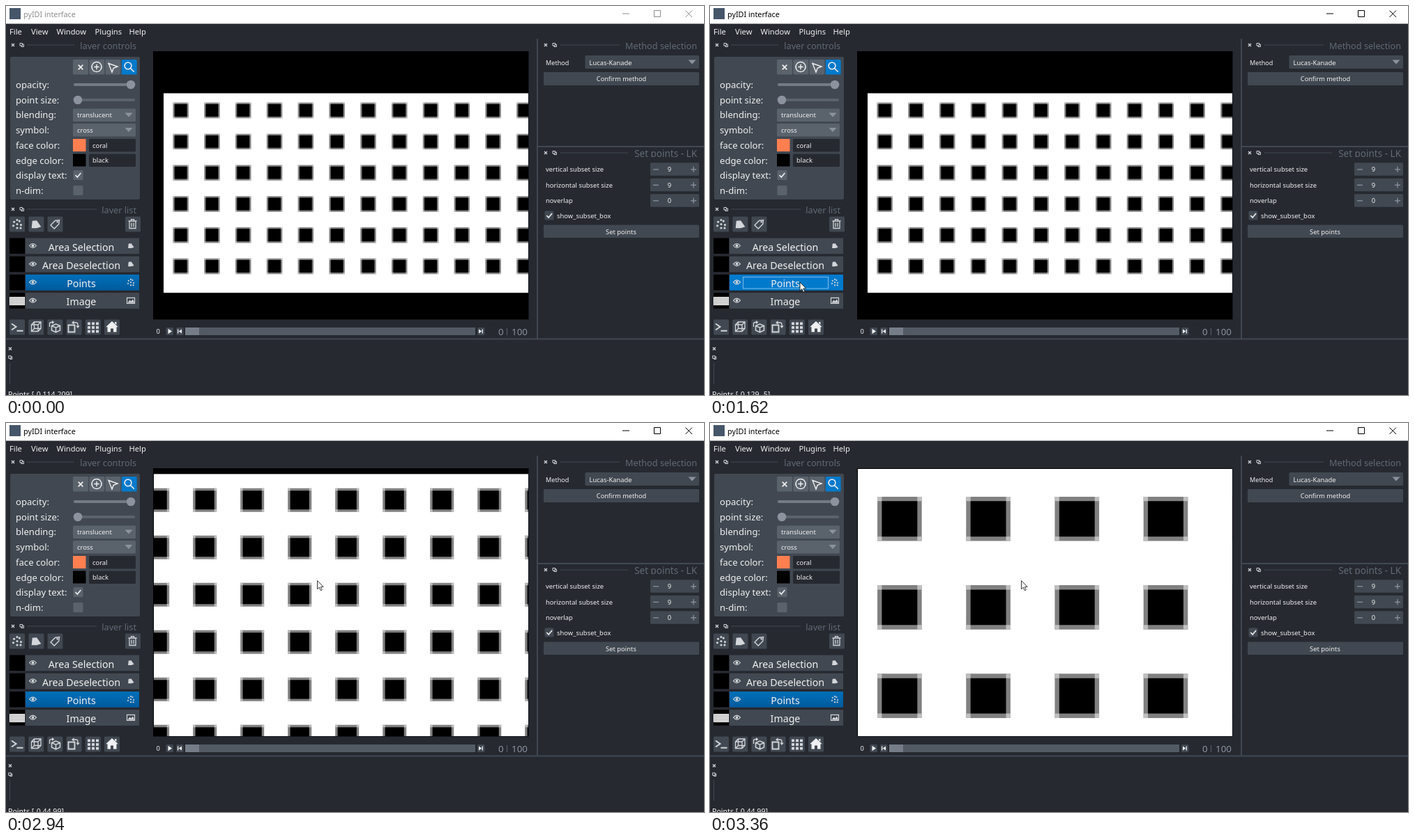
Animation, 1001 px wide and 559 px high, one loop 3.46 s. Source, as an HTML page:

```html
<!DOCTYPE html>
<html lang="en">
<head>
<meta charset="utf-8">
<title>pyIDI interface</title>
<style>
  html, body { margin: 0; width: 100%; height: 100%; overflow: hidden; background: #262930; }
  svg { display: block; position: absolute; left: 0; top: 0; }
  text { font-family: "Noto Sans", "Open Sans", sans-serif; white-space: pre; }
</style>
</head>
<body>
<svg id="stage" width="1001" height="559" viewBox="0 0 1001 559"></svg>
<script>
const BG = '#262930', PANEL = '#414851', PRIMARY = '#5a626c', LIGHT = '#8b939e',
      TEXT = '#f0f1f2', ICON = '#d3d6da', BLUE = '#007acc';

const rect = (x, y, w, h, fill, extra = '') =>
  `<rect x="${x}" y="${y}" width="${w}" height="${h}" fill="${fill}" ${extra}/>`;
const text = (x, y, str, size, fill = TEXT, anchor = 'start', extra = '') =>
  `<text x="${x}" y="${y}" font-size="${size}" fill="${fill}" text-anchor="${anchor}" ${extra}>${str}</text>`;
const line = (d, color = ICON, w = 1.4, extra = '') =>
  `<path d="${d}" fill="none" stroke="${color}" stroke-width="${w}" ${extra}/>`;
const shape = (d, fill = ICON) => `<path d="${d}" fill="${fill}"/>`;
const dot = (x, y, r, fill = ICON) => `<circle cx="${x}" cy="${y}" r="${r}" fill="${fill}"/>`;
const at = (x, y, body) => `<g transform="translate(${x} ${y})">${body}</g>`;
const cross = (x, y, r, color = ICON, w = 1.3) =>
  line(`M${x - r} ${y - r}l${2 * r} ${2 * r}m0 ${-2 * r}l${-2 * r} ${2 * r}`, color, w);
const box = (x, y, w, h, fill = PANEL) => rect(x, y, w, h, fill, 'rx="1.5"');
const check = (x, y) => line(`M${x + 3} ${y + 7}l2.8 3l5 -6`, TEXT, 1.6);
const arrow = (x, y) => shape(`M${x - 5.5} ${y - 3}h11l-5.5 6z`, LIGHT);

// Dock header: close and float marks, rule and a title whose descenders are cut off
const dockMarks = (x, y) => cross(x, y, 2) +
  line(`M${x + 10} ${y - 2.5}h3.5v3.5h-3.5zm2 3.5v1.5h3.5v-3.5h-2`, ICON, 1);
const dock = (x, y, x1, x2, right, title, size) => dockMarks(x, y) +
  line(`M${x1} ${y}H${x2}`, PANEL, 1) +
  text(right, y + 5.5, title, size, '#626a75', 'end') + rect(x2, y + 6.3, right - x2 + 3, 5, BG);

function titleBar() {
  return rect(0, 0, 1001, 25.5, '#fff') + rect(5, 3, 16, 16, '#46566a') +
    `<g id="caption">${text(25, 15.5, 'pyIDI interface', 10.8, 'currentColor')}` +
    line('M884 11H894M929.5 6.5h9v9h-9zM974.5 6.5l9.5 9.5m0 -9.5l-9.5 9.5', 'currentColor', 1) + '</g>' +
    [['File', 5], ['View', 36], ['Window', 72.5], ['Plugins', 127.5], ['Help', 176.5]]
      .map(([s, x]) => text(x, 41, s, 11.2)).join('');
}

function layerControls() {
  const labels = ['opacity:', 'point size:', 'blending:', 'symbol:', 'face color:',
                  'edge color:', 'display text:', 'n-dim:'];
  let s = dock(10, 56, 30, 98, 187, 'layer controls', 12.7) + rect(6, 73, 186, 205, PANEL, 'rx="2"');
  [96, 119.3, 142.5, 165.7].forEach((x, i) => s += box(x, 77, 22, 21.5, i === 3 ? BLUE : PRIMARY));
  s += cross(107, 88, 3.3, TEXT, 1.7) +
    line('M130 80.5a7 7 0 1 0 .01 0M130 83.7v7.6M126.2 87.5h7.6', TEXT, 1.4) +
    line('M147 82.5l13 4.5l-5.8 2.4l-2.2 5.6z', TEXT, 1.4) +
    line('M175 81a4.9 4.9 0 1 0 .01 0M178.5 89.5l5.3 5.3', TEXT, 1.6);
  labels.forEach((l, i) => s += text(14, 118 + i * 21.7, l, 13.1));
  [[113, 179], [135, 103]].forEach(([y, x]) =>
    s += rect(97, y - 2, 88, 4, PRIMARY, 'rx="2"') + dot(x, y, 6.3, LIGHT));
  s += rect(97, 111, 76, 4, '#737b86', 'rx="2"');
  [['translucent', 147.5], ['cross', 169]].forEach(([l, y]) =>
    s += box(96, y, 90, 18.5, PRIMARY) + text(102, y + 12.7, l, 9.4) + arrow(176, y + 9));
  [['coral', 191, '#ff7f50'], ['black', 212.5, '#000']].forEach(([l, y, c]) =>
    s += rect(96, y, 18.5, 18, c) + box(119, y, 67, 18.5, BG) + text(124, y + 12.6, l, 9.4));
  return s + box(96.5, 236, 14, 14, PRIMARY) + check(96.5, 236) + box(96.5, 258, 14, 14, PRIMARY);
}

const ICONS = {
  points: k => [[0, 0], [-4, -3], [3, -4], [5, 1], [-5, 2], [0, 5], [0, -5.5], [4.5, 5]]
    .map(([x, y]) => dot(x * k, y * k, 1.4 * k)).join(''),
  shapes: k => shape(`M${-5 * k} ${-5 * k}L${k} ${-5.5 * k}L${7 * k} ${3 * k}L${k} ${5 * k}L${-6 * k} ${5 * k}z`),
  image: () => line('M-5.5 -4h11v8h-11z', ICON, 1.2) + shape('M-4.5 3l3 -4l2 2l2.5 -3l2 5z'),
  eye: () => line('M-5 0Q0 -6 5 0Q0 6 -5 0z', ICON, 1.1) + dot(0, 0, 1.9)
};

function layerList() {
  let s = dock(10, 292, 30, 130, 187, 'layer list', 12.7);
  [5, 32.5, 59.5, 171].forEach(x => s += box(x, 302.5, 22, 22));
  s += at(16, 313.5, ICONS.points(1.1)) + at(43, 314, ICONS.shapes(1.05)) +
    line('M64 315l6.5 -6.5l6 -1l-.8 6l-6.5 6.5z') + dot(73.7, 310.3, 1.2) +
    line('M175.5 309h12M179.5 308.5v-1.8h4v1.8M177 309.5v10h9v-10M180 311.5v6M183 311.5v6', ICON, 1.3);
  [['Area Selection', 'shapes'], ['Area Deselection', 'shapes'], ['Points', 'points'], ['Image', 'image']]
    .forEach(([name, icon], i) => {
      const y = 333.5 + i * 26.2;
      s += rect(5, y, 22, 22.5, '#000') +
        rect(28, y, 163, 22.8, i === 2 ? 'url(#row)' : PANEL, i === 2 ? 'id="points"' : '') +
        text(108, y + 18, name, 14.2, TEXT, 'middle') +
        at(38.5, y + 11, ICONS.eye()) + at(179, y + 11.3, ICONS[icon](icon === 'points' ? .8 : .65));
    });
  s += rect(47.5, 389.5, 122, 16.5, 'none', 'id="focus" stroke="#7fbbe8" stroke-width="1"');
  s += rect(5, 418, 22, 12, '#fff');
  for (let i = 0; i < 60; i++) s += rect(6 + i % 10 * 2.1, 419 + Math.floor(i / 10) * 1.8, .9, .9, '#222');
  return s;
}

function viewerButtons() {
  let s = '';
  for (let i = 0; i < 6; i++) s += box(5 + i * 27.2, 450.5, 22, 22);
  s += line('M8 456.5l6.5 4.5l-6.5 4.5M15.5 466.8h9', ICON, 2) +
    line('M36.5 458l4 -4h9.5v9.5l-4 4h-9.5zM36.5 458h9.5v9.5M46 458l4 -4M40.5 454v9.5h9.5M40.5 463.5l-4 4', ICON, 1.3) +
    line('M65.5 459.5l6 -2.5l6 2.5v6.5l-6 3l-6 -3zM65.5 459.5l6 2.7l6 -2.7M71.5 462.2v6.8', ICON, 1.5) +
    line('M62.5 461v-4.5q0 -2 3 -2h1', ICON, 1.3) + shape('M66 452l3.5 2.5l-3.5 2.5z') +
    line('M89.5 458.5h9v10h-9z', ICON, 1.9) + line('M96.5 455h4q2.5 0 2.5 3v2', ICON, 1.3) +
    shape('M97.5 452.3v5.4l-3.5 -2.7zM100.3 459.5h5.4l-2.7 3.5z');
  for (let i = 0; i < 9; i++) s += rect(117 + i % 3 * 6, 454.5 + Math.floor(i / 3) * 5.6, 4, 3.8, ICON);
  return s + shape('M152 453l8.8 8.3h-2.3v7.2h-4.5v-5h-4v5h-4.5v-7.2h-2.3zM156 454h2.4v4l-2.4 -2z', '#eef0f1');
}

function dims() {
  let s = text(215.5, 471.3, '0', 9.4) + rect(257, 462, 416, 11, '#525a64') + rect(257, 462, 20, 11, '#757d88');
  [229.5, 244, 676].forEach(x => s += box(x, 462, 10.5, 11));
  return s + shape('M232.5 463.7l5.5 3.8l-5.5 3.8z', TEXT) +
    shape('M246 464.5h1.3v6h-1.3zM252 464.5v6l-4.3 -3z', TEXT) +
    shape('M678 464.5l4.3 3l-4.3 3zM682.7 464.5h1.3v6h-1.3z', TEXT) +
    text(706, 472.6, '0', 13.4, LIGHT) + line('M718.5 463v10', PRIMARY, 1) + text(725, 473, '100', 13.4, LIGHT);
}

function rightPanel() {
  let s = line('M762 47V478', PANEL, 2) + line('M762 202H1001M0 478.5H1001', PANEL, 2) +
    dock(774, 56, 795, 880, 991, 'Method selection', 12.7) +
    text(774, 84.5, 'Method', 9.1) + box(830.5, 71, 163.5, 19) + text(836.5, 84.5, 'Lucas-Kanade', 9.4) + arrow(984, 80.5) +
    box(771, 95, 223, 19) + text(882.5, 108.3, 'Confirm method', 9.2, TEXT, 'middle') +
    dock(774, 211, 795, 892, 991, 'Set points - LK', 13.5);
  [['vertical subset size', 9], ['horizontal subset size', 9], ['noverlap', 0]].forEach(([l, v], i) => {
    const y = 234.8 + i * 22.5;
    s += text(774, y + 3.6, l, 9.45) + box(924, y - 9.5, 70, 18.5) + text(951.5, y + 3.6, v, 9.4, TEXT, 'middle') +
      line(`M928 ${y}h8M982 ${y}h8M986 ${y - 4}v8`, LIGHT, 1.3);
  });
  return s + box(772.5, 294.5, 13, 13) + check(772.3, 294) + text(790, 305, 'show_subset_box', 9.45) +
    box(771, 314.5, 223, 18.5) + text(882, 327.5, 'Set points', 9.4, TEXT, 'middle');
}

// Test image in its own pixels: 10 px squares every 20 px with a grey one-pixel edge
function viewer() {
  let edge = '', corner = '', core = '';
  for (let c = 0; c < 14; c++) for (let r = 0; r < 6; r++) {
    const x = 6 + c * 20, y = 6 + r * 20;
    edge += `M${x} ${y}h10v10h-10z`;
    core += `M${x + 1} ${y + 1}h8v8h-8z`;
    for (const dx of [0, 9]) for (const dy of [0, 9]) corner += `M${x + dx} ${y + dy}h1v1h-1z`;
  }
  return rect(211, 65, 538.5, 385.5, '#000') +
    `<g clip-path="url(#view)"><g id="image">${rect(0, 0, 300, 128, '#fff')}` +
    shape(edge, '#808080') + shape(corner, '#bfbfbf') + shape(core, '#000') + '</g></g>';
}

const stage = document.getElementById('stage');
stage.innerHTML = `<defs>
  <linearGradient id="row" x2="0" y2="1"><stop stop-color="#0070ba"/><stop offset="1" stop-color="#005a9c"/></linearGradient>
  <clipPath id="view"><rect x="212" y="66" width="537" height="384"/></clipPath></defs>` +
  rect(0, 0, 1001, 559, BG) + titleBar() + layerControls() + layerList() + viewerButtons() +
  viewer() + dims() + rightPanel() +
  cross(6, 492.5, 2) + line('M3.7 502.8h3.5v3.5h-3.5zm2 3.5v1.2h3v-3.5h-1.5', ICON, 1) + line('M5.5 513V543', PANEL, 1) +
  text(3, 562.3, '', 10.6, TEXT, 'start', 'id="status"') +
  '<path id="cursor" d="M0 0V12.2L2.8 9.6L4.8 14.2L6.8 13.3L4.8 8.9H8.6Z" fill="#fff" stroke="#222" stroke-width=".9"/>';

const LOOP = 3460, ZOOM = 1.11, PX = 2.24, PIVOT = [446.56, 225.9], ORIGIN = [226, 125.4];
const HOVER = 1220, CLICK = 1420, ENTER = 2640;

// time, pointer x, pointer y, wheel clicks
const steps = [
  [0, -50, 0, 0],
  [500, 879, 444, 0], [600, 735, 432, 0], [700, 530, 425, 0], [800, 350, 419, 0], [900, 225, 417, 0], [1020, 153, 417, 0],
  [1120, 139.5, 412, 0], [1220, 135, 405, 0], [1320, 132, 400, 0], [1420, 130, 398, 0], [1620, 129, 397, 0],
  [2040, 133, 391, 0], [2140, 145, 375, 0], [2240, 164, 351, 0], [2340, 177.5, 335, 0], [2440, 245, 275, 0], [2540, 338, 211, 0],
  [2640, 446.5, 226.5, 0], [2740, 446.5, 226.5, 1], [2840, 446.5, 226.5, 2], [2940, 446.5, 226.5, 4],
  [3040, 446.5, 226.5, 6], [3140, 446.5, 226.5, 8], [3360, 446.5, 226.5, 10]
];
const [caption, points, focus, image, status, cursor] =
  ['caption', 'points', 'focus', 'image', 'status', 'cursor'].map(id => document.getElementById(id));

function position(t, x, y) {
  if (t < 600) return '114 209';
  if (t >= 1020 && t < 2440) return '129 -5';
  if (t >= ENTER) return '44 99';
  return `${Math.round((y - ORIGIN[1]) / PX)} ${Math.round((x - ORIGIN[0]) / PX)}`;
}

let shown = -1;
function draw(now) {
  const t = now % LOOP;
  const i = steps.findLastIndex(s => s[0] <= t);
  if (i !== shown) {
    shown = i;
    const [time, x, y, wheel] = steps[i];
    const k = ZOOM ** wheel;
    const [ox, oy] = ORIGIN.map((o, n) => PIVOT[n] + (o - PIVOT[n]) * k);
    image.setAttribute('transform', `translate(${ox} ${oy}) scale(${PX * k})`);
    cursor.setAttribute('transform', `translate(${x} ${y})`);
    caption.setAttribute('color', time >= CLICK ? '#000' : '#8c8c8c');
    points.setAttribute('fill', time >= HOVER && time < ENTER ? BLUE : 'url(#row)');
    focus.setAttribute('visibility', time >= CLICK && time < ENTER ? 'visible' : 'hidden');
    status.textContent = `Points [-0 ${position(time, x, y)}]`;
  }
}

const start = performance.now();
function tick() {
  draw(performance.now() - start);
  requestAnimationFrame(tick);
}
tick();
</script>
</body>
</html>
```
